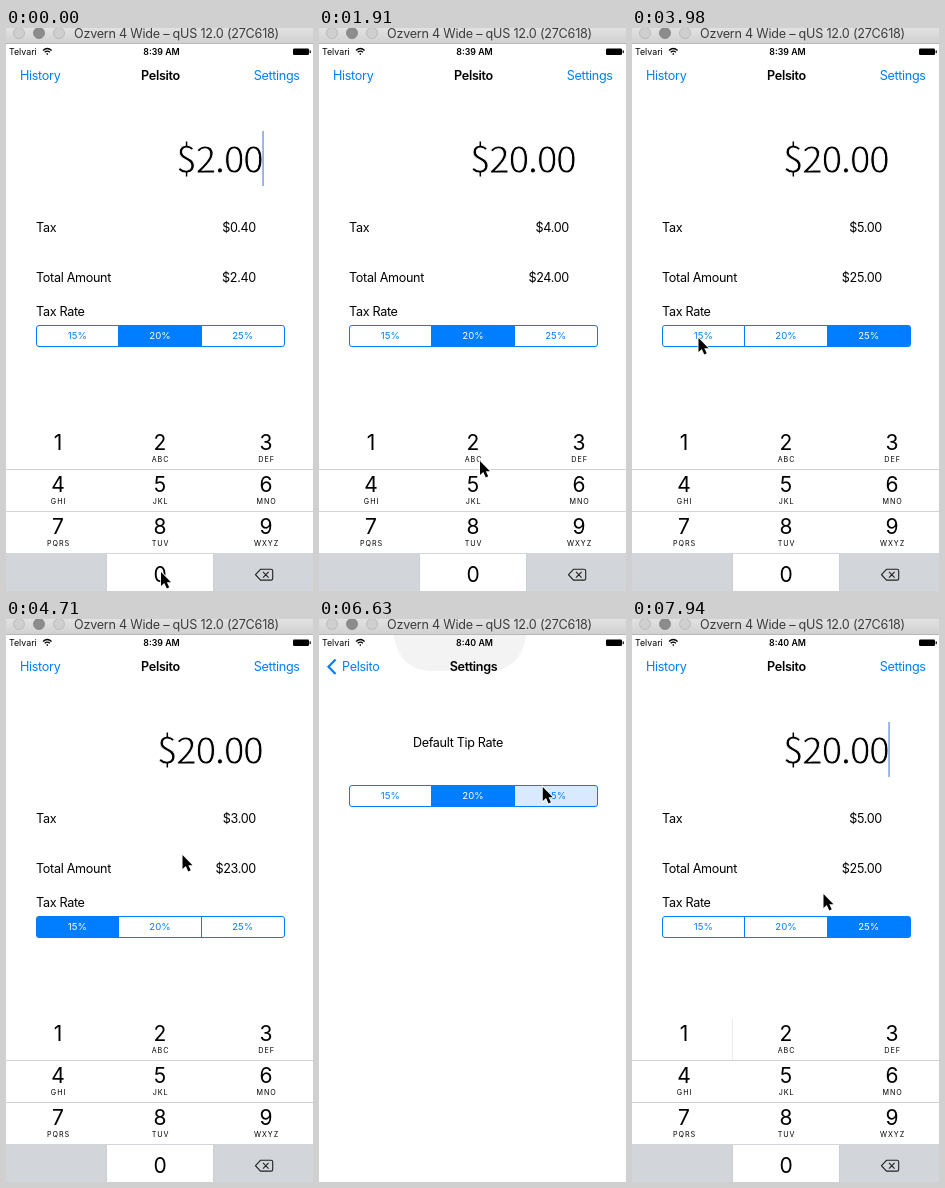
Recreate the animation shown at these times as an HTML page. Size 307 by 563 pixels, loop 8 s.

```html
<!DOCTYPE html>
<html lang="en">
<head>
<meta charset="utf-8">
<title>Tip calculator</title>
<style>
html, body { margin: 0; width: 100%; height: 100%; overflow: hidden; background: #fff; }
svg { display: block; width: 307px; height: 563px; }
text { font: 12.6px Inter, "Liberation Sans", sans-serif; letter-spacing: -.025em; fill: #000; }
.blue { fill: #007eff; }
.bold { font-weight: 600; }
.mid { text-anchor: middle; }
.end { text-anchor: end; }
.window { font-size: 12.6px; letter-spacing: -.018em; fill: #3c3c3c; }
.status { font-size: 8.8px; letter-spacing: 0; }
/* The white outline thins the strokes of the regular weight */
.amount {
  font: 300 37.5px "Noto Sans CJK JP", "Noto Sans CJK SC", "Noto Sans", sans-serif;
  letter-spacing: -.04em; stroke: #fff; stroke-width: .9;
}
.rate { font-size: 9.6px; letter-spacing: 0; }
.digit { font-size: 21px; letter-spacing: 0; }
.letters { font-size: 7.2px; letter-spacing: .13em; }
#pointer { stroke: #fff; stroke-width: 1.6; paint-order: stroke; }
</style>
</head>
<body>
<svg viewBox="0 0 307 563">
  <defs>
    <linearGradient id="chrome" x2="0" y2="1">
      <stop stop-color="#e2e2e2"/><stop offset="1" stop-color="#d0d0d0"/>
    </linearGradient>
  </defs>
  <rect width="307" height="563" fill="#fff"/>

  <g id="main">
    <text id="amount" class="amount end" x="256.3" y="145"></text>
    <rect id="caret" x="256.3" y="103" width="1.5" height="55" fill="#7f9cf0"/>
    <text x="30" y="204">Tax</text>
    <text id="tax" class="end" x="250" y="204"></text>
    <text x="30" y="254">Total Amount</text>
    <text id="total" class="end" x="250" y="254"></text>
    <text x="30" y="288">Tax Rate</text>
    <g id="mainRates" transform="translate(30.5 297.5)"></g>
  </g>

  <g id="keypad"></g>

  <g id="settings">
    <rect y="31" width="307" height="532" fill="#fff"/>
    <text class="mid" x="139" y="127.5">Default Tip Rate</text>
    <g id="defaultRates" transform="translate(30.5 166.5)"></g>
  </g>

  <path id="shade" d="M75 16H207C205 38 190 52 170 52H112C92 52 77 38 75 16z" fill="#f3f3f3"/>

  <g id="mainNav">
    <text class="blue" x="14" y="52">History</text>
    <text class="bold mid" x="154.5" y="52">Pelsito</text>
    <text id="settingsLink" class="blue end" x="293.7" y="52">Settings</text>
  </g>
  <g id="settingsNav">
    <g id="back">
      <path d="M16.5 40.5 9.5 47.7l7 7.2" fill="none" stroke="#007eff" stroke-width="2.2"/>
      <text class="blue" x="23" y="52">Pelsito</text>
    </g>
    <text class="bold mid" x="154.5" y="52">Settings</text>
  </g>

  <text class="status" x="3" y="27">Telvari</text>
  <g fill="none" stroke="#000" stroke-width="1.3">
    <path d="M37 22.4q4.3-3.8 8.6 0M38.7 24.3q2.6-2.2 5.2 0"/>
    <path d="M40.6 26h1.4"/>
  </g>
  <text id="clock" class="status bold mid" x="155.5" y="27"></text>
  <rect x="287" y="20.5" width="16" height="6.5" rx="1.3"/>
  <rect x="303.6" y="22.4" width="1.2" height="2.7"/>

  <rect width="307" height="15.5" fill="url(#chrome)"/>
  <rect y="15" width="307" height="1" fill="#b8b8b8"/>
  <g stroke="#b4b4b4" stroke-width=".8">
    <circle cx="13" cy="5" r="5.5" fill="#cfcfcf"/>
    <circle cx="33" cy="5" r="5.5" fill="#8c8c8c" stroke="#808080"/>
    <circle cx="53" cy="5" r="5.5" fill="#cfcfcf"/>
  </g>
  <text class="window" x="68" y="10">Ozvern 4 Wide – qUS 12.0 (27C618)</text>

  <path id="pointer" d="M0 0V14l3.3-3 2.5 5.4 2.4-1.1-2.4-5.1H10z"/>
</svg>
<script>
const LOOP = 8000, STEP = 147.06, LEAD = 12, WIDTH = 307;
const RATES = [15, 20, 25];
const BLUE = '#007eff', PALE = '#d9e9ff', KEY_GREY = '#d2d5da';
const el = id => document.getElementById(id);

// Pointer stops: step, x, y
const POINTER = [
  [0, 155, 544], [2, 155, 544], [5, 150, 543], [7, 150, 543], [9, 157, 464],
  [10, 157, 464], [16, 165, 402], [17, 165, 402], [20, 168.5, 326.5], [22, 228, 306],
  [23, 228, 306], [25, 115, 308], [27, 66.5, 310], [29, 66.5, 310], [32, 176.5, 236],
  [33, 205, 138], [35, 266, 52], [36, 275, 46], [41, 275, 46], [44, 224, 167],
  [46, 223.5, 169], [49, 32, 47], [50, 32, 47], [54, 191.5, 275]
];

// State changes, each kept until overwritten; slide 1 = settings fully shown
const CHANGES = [
  [0, { bill: 2, rate: 1, pressed: -1, preset: 1, presetPressed: -1, slide: 0, clock: '8:39 AM' }],
  [6, { zero: true }],
  [7, { bill: 20 }],
  [8, { zero: false }],
  [22, { pressed: 2 }],
  [23, { pressed: -1, rate: 2 }],
  [28, { pressed: 0 }],
  [29, { pressed: -1, rate: 0 }],
  [35, { clock: '8:40 AM' }],
  [36, { link: true }],
  [39, { slide: .12 }],
  [40, { slide: .7 }],
  [41, { slide: .95, link: false }],
  [42, { slide: 1, shade: true }],
  [45, { presetPressed: 2 }],
  [46, { presetPressed: -1, preset: 2 }],
  [50, { back: true }],
  [51, { slide: .6, rate: 2, back: false, shade: false }],
  [52, { slide: .12 }],
  [53, { slide: 0, seam: true }]
];

function buildRates(group) {
  const w = 248, h = 21;
  const edge = i => Math.floor(i * w / 3);
  group.innerHTML =
    RATES.map((r, i) => `<rect x="${edge(i)}" width="${edge(i + 1) - edge(i)}" height="${h}"/>`).join('') +
    `<path d="M${edge(1)} 0v${h}M${edge(2)} 0v${h}" stroke="${BLUE}"/>` +
    `<rect x="-.8" y="-.8" width="${w + 1.6}" height="${h + 1.6}" rx="3" fill="none" stroke="#fff"/>` +
    `<rect width="${w}" height="${h}" rx="2.5" fill="none" stroke="${BLUE}"/>` +
    RATES.map((r, i) => `<text class="rate mid" x="${(i + .5) * w / 3 - .5}" y="13.8">${r}%</text>`).join('');
  const cells = [...group.querySelectorAll('rect')].slice(0, 3);
  const labels = group.querySelectorAll('text');
  return (selected, pressed) => cells.forEach((cell, i) => {
    cell.style.fill = i === selected ? BLUE : i === pressed ? PALE : '#fff';
    labels[i].style.fill = i === selected ? '#fff' : BLUE;
  });
}

function buildKeypad(group) {
  const letters = ['', 'ABC', 'DEF', 'GHI', 'JKL', 'MNO', 'PQRS', 'TUV', 'WXYZ'];
  const columns = [52, 154, 260];
  const keys = letters.map((word, i) => {
    const x = columns[i % 3], y = 421.5 + Math.floor(i / 3) * 42.4;
    return `<text class="digit mid" x="${x}" y="${y}">${i + 1}</text>` +
      `<text class="letters mid" x="${x + .6}" y="${y + 12}">${word}</text>`;
  }).join('');
  group.innerHTML = `
    <rect y="399" width="307" height="164" fill="#fff"/>
    <rect y="525" width="307" height="38" fill="${KEY_GREY}"/>
    <path d="M100.5 526v37M207.5 526v37" stroke="#cbced3"/>
    <rect id="zeroKey" x="101" y="526" width="106" height="37"/>
    <path d="M0 441.5H307M0 483.5H307" stroke="#d2d3d6"/>
    <path id="seam" d="M100.5 400v41" stroke="#ececec"/>
    ${keys}<text class="digit mid" x="154" y="553.8">0</text>
    <path d="M249.5 546.7l5-5.4H265q1.7 0 1.7 1.7v7.4q0 1.7-1.7 1.7H254.5z
      M257 543.8l5.6 5.8M262.6 543.8l-5.6 5.8" fill="none" stroke="#222" stroke-width="1.1"/>`;
}

const paintMainRates = buildRates(el('mainRates'));
const paintDefaultRates = buildRates(el('defaultRates'));
buildKeypad(el('keypad'));

const money = n => '$' + n.toFixed(2);
const show = (id, on) => el(id).style.opacity = Number(on);
const move = (id, x, y = 0) => el(id).setAttribute('transform', `translate(${x} ${y})`);

function pointerAt(step) {
  const next = POINTER.findIndex(p => p[0] > step);
  if (next < 0) return POINTER[POINTER.length - 1].slice(1);
  const [s0, x0, y0] = POINTER[next - 1], [s1, x1, y1] = POINTER[next];
  const k = (step - s0) / (s1 - s0);
  return [x0 + (x1 - x0) * k, y0 + (y1 - y0) * k];
}

function draw(step) {
  const state = Object.assign({}, ...CHANGES.filter(c => c[0] <= step).map(c => c[1]));
  const tax = state.bill * RATES[state.rate] / 100;
  const p = state.slide;

  el('amount').textContent = money(state.bill);
  el('tax').textContent = money(tax);
  el('total').textContent = money(state.bill + tax);
  el('clock').textContent = state.clock;
  paintMainRates(state.rate, state.pressed);
  paintDefaultRates(state.preset, state.presetPressed);
  el('zeroKey').style.fill = state.zero ? KEY_GREY : '#fff';

  show('caret', step >= 51 || step % 7 < 4);
  show('seam', !!state.seam);
  show('shade', !!state.shade);
  show('settingsLink', state.link ? .25 : 1);
  show('back', state.back ? .25 : 1);
  show('mainNav', 1 - p);
  show('settingsNav', p);

  move('main', -92 * p);
  move('keypad', -WIDTH * p);
  move('settings', WIDTH * (1 - p));
  move('mainNav', -70 * p);
  move('settingsNav', 100 * (1 - p));
  move('pointer', ...pointerAt(step));
}

let shown = -1;
function tick() {
  const step = Math.floor((performance.now() % LOOP + LEAD) / STEP);
  if (step !== shown) draw(shown = step);
  requestAnimationFrame(tick);
}
tick();
</script>
</body>
</html>
```
